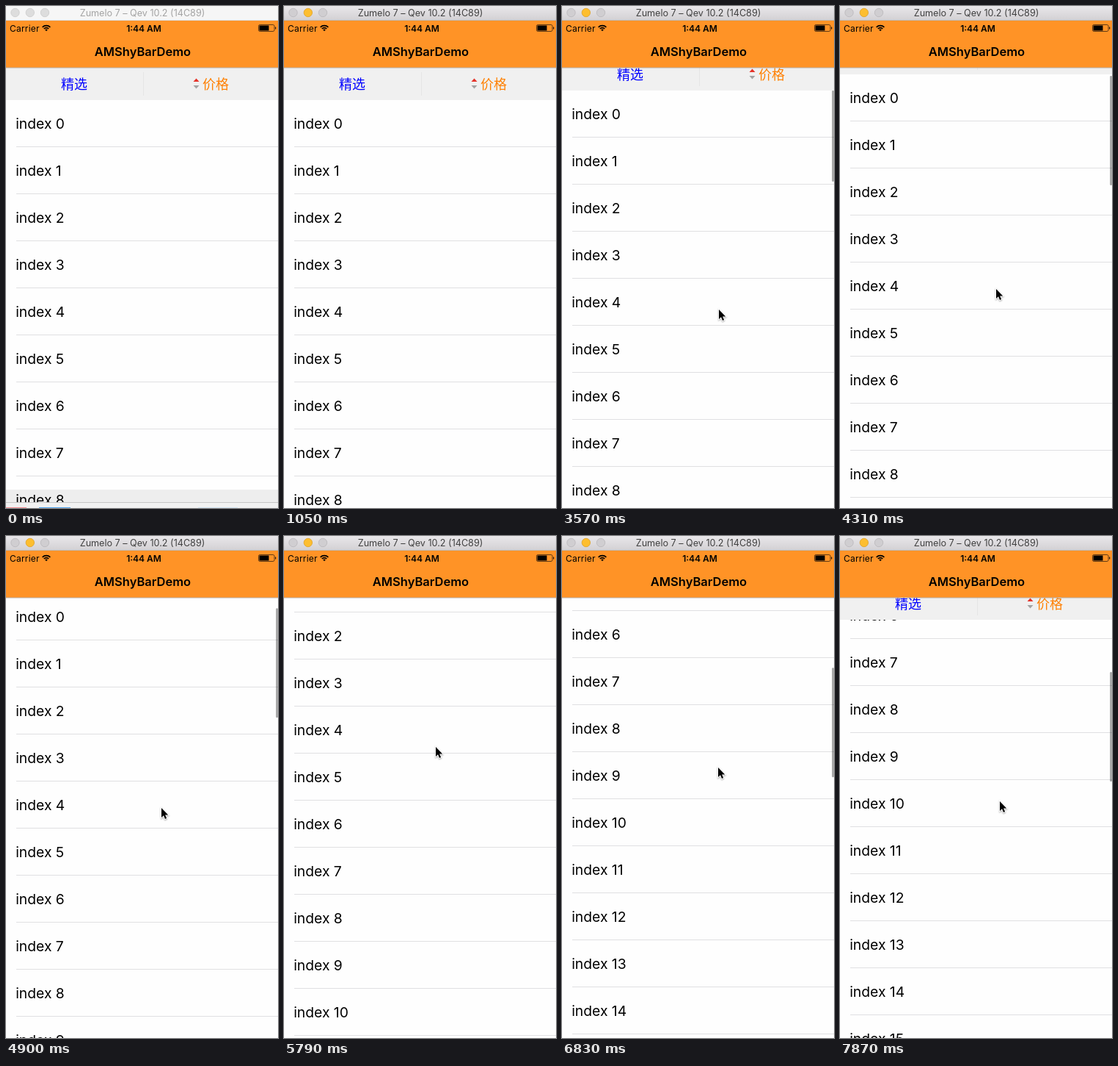
These frames come from a looping animation (371 by 683 pixels, 8000 ms). An HTML page with a canvas:

```html
<!DOCTYPE html>
<html lang="zh-CN">
<head>
<meta charset="utf-8">
<title>Shy bar demo</title>
<style>
  html, body { margin: 0; width: 100%; height: 100%; overflow: hidden; background: #fefefe; }
  canvas { display: block; width: 371px; height: 683px; }
</style>
</head>
<body>
<canvas id="stage"></canvas>
<script>
const W = 371, H = 683, LOOP = 8000;
const NAV_BOTTOM = 84, BAR_H = 44, ROW_H = 64;
const STEP = 148.15, STEP_BASE = 2240;
const LATIN = 'Inter, Roboto, sans-serif';
const CJK = '"Noto Sans CJK SC", "Noto Sans CJK", sans-serif';

// [time, scroll offset]
const SCROLL = [
  [3120, 0], [3277, 3], [3573, 13], [4314, 35], [4907, 50], [5200, 98],
  [5351, 132], [5500, 152], [6240, 152], [6388, 185], [6536, 270],
  [6684, 350], [6833, 410], [6981, 446], [7129, 466], [7277, 466],
  [7425, 464], [7573, 458], [7721, 448], [7870, 436]
];

// [time, x, y] of the pointer tip
const POINTER = [
  [1190, 292, 421], [1499, 292, 421], [1647, 240, 394], [1795, 215, 380],
  [2091, 215, 380], [2240, 216, 384], [2388, 215, 397], [2536, 214, 416],
  [2684, 214, 437], [2832, 214, 437], [2980, 214, 438], [3129, 214, 438],
  [3277, 214, 428], [3573, 214, 413], [4314, 213, 385], [4907, 212, 370],
  [5351, 208, 300], [5500, 207, 287], [5796, 207, 287], [5944, 208, 330],
  [6092, 210, 395], [6240, 211, 412], [6388, 212, 380], [6536, 213, 335],
  [6684, 213, 316], [6833, 213, 315], [6981, 213, 318], [7129, 213, 321],
  [7277, 213, 321], [7425, 214, 324], [7573, 215, 332], [7721, 216, 346],
  [7870, 218, 361]
];

const canvas = document.getElementById('stage');
const ctx = canvas.getContext('2d');
const dpr = window.devicePixelRatio || 1;
canvas.width = W * dpr;
canvas.height = H * dpr;

function sample(keys, t, col) {
  if (t <= keys[0][0]) return keys[0][col];
  for (let i = 1; i < keys.length; i++) {
    const a = keys[i - 1], b = keys[i];
    if (t <= b[0]) return a[col] + (b[col] - a[col]) * (t - a[0]) / (b[0] - a[0]);
  }
  return keys[keys.length - 1][col];
}

function rect(x, y, w, h, color) {
  ctx.fillStyle = color;
  ctx.fillRect(x, y, w, h);
}

function text(str, x, y, font, color, align = 'left', spacing = 0) {
  ctx.font = font;
  ctx.fillStyle = color;
  ctx.textAlign = align;
  ctx.letterSpacing = spacing + 'px';
  ctx.fillText(str, x, y);
}

function polygon(points, color) {
  ctx.beginPath();
  points.forEach(([x, y]) => ctx.lineTo(x, y));
  ctx.closePath();
  ctx.fillStyle = color;
  ctx.fill();
}

function dot(x, y, r, fill, edge) {
  ctx.beginPath();
  ctx.arc(x, y, r, 0, Math.PI * 2);
  ctx.fillStyle = fill;
  ctx.fill();
  if (edge) {
    ctx.strokeStyle = edge;
    ctx.lineWidth = 0.8;
    ctx.stroke();
  }
}

function drawRows(offset) {
  rect(0, NAV_BOTTOM, W, H - NAV_BOTTOM, '#fefefe');
  const first = Math.max(0, Math.floor((offset - BAR_H) / ROW_H));
  for (let i = first; ; i++) {
    const top = NAV_BOTTOM + BAR_H + i * ROW_H - offset;
    if (top > H) break;
    text('index ' + i, 13.2, top + 39, '19.3px ' + LATIN, '#000');
    rect(14, top + 63, W - 14, 1, '#e0e0e2');
  }
}

function drawIndicator(offset) {
  const bottom = 236 + 0.225 * offset;
  const top = Math.max(128 - offset, bottom - 149);
  ctx.beginPath();
  ctx.roundRect(368.3, top, 2.5, bottom - top, 1.2);
  ctx.fillStyle = 'rgba(0,0,0,0.38)';
  ctx.fill();
}

function drawBar(shown) {
  if (shown <= 0) return;
  const y = NAV_BOTTOM - BAR_H + shown;
  rect(0, y, W, BAR_H, '#f0f0f0');
  rect(187, y + 6, 1, 32, '#e5e5e5');
  text('精选', 93, y + 28.7, '18px ' + CJK, '#0000ff', 'center');
  text('价格', 286, y + 28.7, '18px ' + CJK, '#ff8000', 'center');
  polygon([[255.5, y + 19], [259.5, y + 14.5], [263.5, y + 19]], '#e5332a');
  polygon([[255.5, y + 24], [263.5, y + 24], [259.5, y + 28.5]], '#a3a3a3');
}

function drawWifi(x, y) {
  ctx.strokeStyle = '#000';
  ctx.lineWidth = 1.6;
  for (const r of [4.6, 7.6]) {
    ctx.beginPath();
    ctx.arc(x, y, r, -Math.PI * 0.75, -Math.PI * 0.25);
    ctx.stroke();
  }
  ctx.beginPath();
  ctx.moveTo(x, y);
  ctx.arc(x, y, 2.6, -Math.PI * 0.75, -Math.PI * 0.25);
  ctx.closePath();
  ctx.fillStyle = '#000';
  ctx.fill();
}

function drawBattery() {
  ctx.strokeStyle = '#3a2410';
  ctx.lineWidth = 0.8;
  ctx.beginPath();
  ctx.roundRect(344.5, 25.5, 21.5, 9, 1.8);
  ctx.stroke();
  rect(345.5, 26.5, 13, 7, '#000');
  rect(367, 28.5, 1.3, 3, '#3a2410');
}

function drawNav() {
  rect(0, 19, W, NAV_BOTTOM - 19, '#ff9326');
  rect(0, NAV_BOTTOM - 0.5, W, 1, '#b9aea3');
  text('Carrier', 5, 34.5, '12px ' + LATIN, '#000', 'left', 0.2);
  drawWifi(55, 34.2);
  text('1:44 AM', 188, 34.5, '600 12px ' + LATIN, '#000', 'center');
  drawBattery();
  text('AMShyBarDemo', 186.5, 68, '600 16.5px ' + LATIN, '#000', 'center');
}

function drawWindowBar(active) {
  if (active) {
    const g = ctx.createLinearGradient(0, 0, 0, 19);
    g.addColorStop(0, '#e9e7ea');
    g.addColorStop(1, '#d3d1d4');
    rect(0, 0, W, 19, g);
    rect(0, 19, W, 1, '#c3b6a8');
  } else {
    rect(0, 0, W, 20, '#f6f6f6');
    rect(0, 19, W, 1, '#dcd6d0');
  }
  const grey = active ? '#d0ced1' : '#dddddd';
  const edge = active ? '#b9b7ba' : '#cbcbcb';
  dot(12.5, 9, 5.7, grey, edge);
  dot(32.8, 9, 5.7, active ? '#fdbe2f' : grey, active ? '#dfa023' : edge);
  dot(53, 9, 5.7, grey, edge);
  text('Zumelo 7 – Qev 10.2 (14C89)', 186, 14, '12.6px ' + LATIN,
    active ? '#404040' : '#a3a3a3', 'center');
}

function drawDock() {
  ctx.globalCompositeOperation = 'multiply';
  rect(0, 658, W, 18, '#efefef');
  ctx.globalCompositeOperation = 'source-over';
  rect(0, 675, W, 1, '#c6c6c6');
  rect(0, 676, W, 7, '#f2f2f2');
  rect(0, 682, 28, 1, '#f58f95');
  rect(45, 682, 43, 1, '#52a7ef');
  rect(262, 682, 54, 1, '#d3e4f2');
}

function drawPointer(x, y) {
  ctx.save();
  ctx.translate(x, y);
  ctx.beginPath();
  [[0, 0], [0, 13], [3, 10.3], [5, 15], [7.1, 14.1], [5.1, 9.6], [9.2, 9.4]]
    .forEach(([px, py]) => ctx.lineTo(px, py));
  ctx.closePath();
  ctx.shadowColor = 'rgba(0,0,0,0.35)';
  ctx.shadowBlur = 2 * dpr;
  ctx.shadowOffsetY = dpr;
  ctx.strokeStyle = '#fff';
  ctx.lineWidth = 1.8;
  ctx.stroke();
  ctx.shadowColor = 'transparent';
  ctx.fillStyle = '#000';
  ctx.fill();
  ctx.restore();
}

function draw(now) {
  const ms = now % LOOP;
  const t = STEP_BASE + STEP * Math.floor((ms - STEP_BASE + 14) / STEP);
  const offset = Math.round(sample(SCROLL, t, 1));
  const shown = t < 7200 ? BAR_H - offset : Math.min(BAR_H, 466 - offset);

  ctx.setTransform(dpr, 0, 0, dpr, 0, 0);
  drawRows(offset);
  drawBar(shown);
  if ((t > 3200 && t < 5750) || t > 6300) drawIndicator(offset);
  drawNav();
  drawWindowBar(ms >= 300);
  if (ms < 1050) drawDock();
  if (ms >= 1190) {
    drawPointer(Math.round(sample(POINTER, t, 1)), Math.round(sample(POINTER, t, 2)));
  }
}

function tick() {
  draw(performance.now());
  requestAnimationFrame(tick);
}
tick();
</script>
</body>
</html>
```
